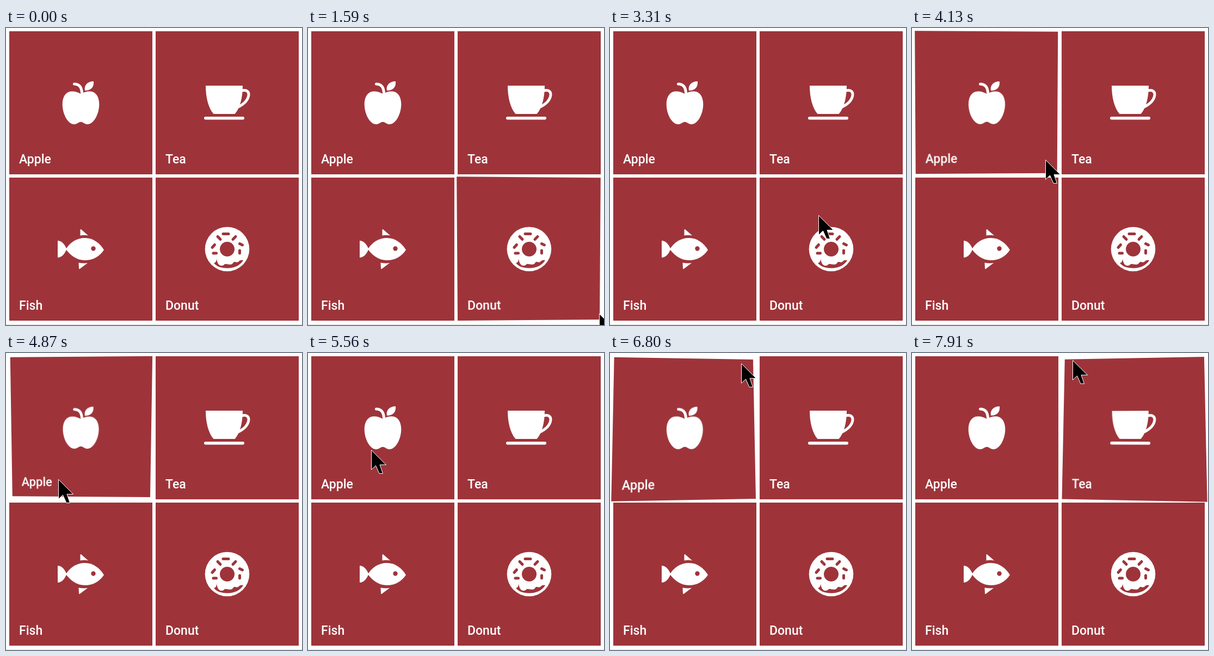
An HTML page for the animation above (8000 ms loop, 544 px wide and 546 px high).

```html
<!DOCTYPE html>
<html lang="en">
<head>
<meta charset="utf-8">
<title>Tilting tiles</title>
<style>
  html, body { margin: 0; width: 100%; height: 100%; overflow: hidden; background: #fff; }
  #stage { position: relative; width: 544px; height: 546px; overflow: hidden; }
  #tiles { position: absolute; left: 6px; top: 6px; display: grid; grid-template: 263px 263px / 263px 263px; gap: 6px; }
  .tile { display: block; width: 263px; height: 263px; background: #9e343a; fill: #fff; }
  .tile text { font: 500 23px Roboto, "Noto Sans", sans-serif; }
  .line, .sprinkle { fill: none; stroke: #fff; stroke-width: 5; stroke-linecap: round; }
  .sprinkle { stroke: #9e343a; }
  .cut { fill: #9e343a; }
  #rule { position: absolute; top: 545px; width: 100%; height: 1px; background: #ddd; }
  #cursor { position: absolute; left: 0; top: 0; width: 30px; height: 46px; }
</style>
</head>
<body>
<div id="stage">
  <div id="rule"></div>
  <div id="tiles">
    <svg class="tile" viewBox="-131.5 -131.5 263 263">
      <path id="half" d="M-1 -16.5H0C5 -19.500 12 -21.500 17 -21C28 -20.500 33.800 -10.500 33.800 2.500C33.800 20.500 24 39.500 12 39.500C6.500 39.500 4 35 0 35H-1Z"/>
      <use href="#half" transform="scale(-1 1)"/>
      <path class="line" d="M-12 -34.500C-3.500 -34.500 1.500 -29.500 2 -18"/>
      <path d="M23.500 -39.500C24.500 -29.500 19.500 -22.500 7.500 -22.500C5.500 -31.500 11.500 -39.500 23.500 -39.500Z"/>
      <text x="-113.5" y="111.5">Apple</text>
    </svg>
    <svg class="tile" viewBox="-131.5 -131.5 263 263">
      <path d="M-39.500 -31.500H28.500C28.500 -10 23.500 10 14 20.500H-25C-34.500 10 -39.500 -10 -39.500 -31.500Z"/>
      <path class="line" d="M27.500 -22.500C35.500 -24.500 40 -20.500 39.500 -14.500C38.500 -5.500 30.500 2.500 20.500 7.500"/>
      <rect x="-42.500" y="25.500" width="74" height="5.500" rx="2.700"/>
      <text x="-113.5" y="111.5">Tea</text>
    </svg>
    <svg class="tile" viewBox="-131.5 -131.5 263 263">
      <path d="M-27.500 0C-19.500 -12.500 -7.500 -20.500 7.500 -20.500S34.500 -11.500 42.500 1.500C34.500 13.500 22.500 20.500 7.500 20.500S-19.500 11.500 -27.500 0Z"/>
      <path d="M-42.500 -15.500Q-32.500 -15.500 -26 0Q-32.500 15.500 -42.500 15.500Z"/>
      <path d="M-1 -35.500Q-.5 -37.500 1.500 -35.500L13.500 -25Q6.500 -26.500 -1 -25Z"/>
      <path d="M-4 25Q4.500 26.500 12.500 25.500L-1.500 36Q-3.500 37.500 -3.500 35Z"/>
      <circle class="cut" cx="23" cy="-1" r="4.200"/>
      <text x="-113.5" y="111.5">Fish</text>
    </svg>
    <svg class="tile" viewBox="-131.5 -131.5 263 263">
      <circle r="40.800"/>
      <circle class="cut" r="13.500"/>
      <path class="sprinkle" d="M-7.500 -28h10M-17.500 -23l5 5M10.500 -18l5 -5M23 -10l5 2.500M23 2.500v5M-27.500 -3l4.500 -5M-25.500 7.500h5.500"/>
      <path class="cut" d="M-19.500 17.500C-18.500 23.500 -16.500 30.500 -10.500 30.500S-6.500 26.500 -1.500 27.500S9.500 29.500 11.500 24.500C13.500 21.500 17.500 26.500 21.500 22.500C24.500 19.500 27.500 20.500 29.500 20.500C24.500 29.500 13.500 35 .5 35S-19.500 31.500 -24.500 25.500C-22.500 25.500 -19.500 23.500 -19.500 17.500Z"/>
      <text x="-113.5" y="111.5">Donut</text>
    </svg>
  </div>
  <svg id="cursor" viewBox="0 0 30 46">
    <path d="M.5 .5V36.500L8.500 29L15 43.500H21.500L16 27.500H27.500Z" stroke="#fff"/>
  </svg>
</div>
<script>
  const LOOP = 8000, TICK = 66.5, PITCH = 269, HALF = 131.5;
  const DEPTH = .0222, SHRINK = .03, SETTLE = .34;
  const tiles = [...document.querySelectorAll('.tile')];
  const cursor = document.getElementById('cursor');

  // Move to a point, rest there, press until `up`, then settle.
  const enter = { time: 390, x: 520, y: 517 };
  const presses = [
    { from: 690, rest: 200, down: 1210, up: 1590, settle: 50, x: 535, y: 525 },
    { from: 1940, down: 2450, up: 2830, x: 451, y: 394 },
    { from: 3020, down: 3810, up: 4130, settle: 40, x: 245, y: 242 },
    { from: 4440, down: 4870, up: 5170, x: 96, y: 232 },
    { from: 5420, down: 5810, up: 6110, x: 147, y: 96 },
    { from: 6360, down: 6800, up: 7100, x: 241, y: 19 },
    { from: 7410, down: 7910, up: LOOP, x: 295, y: 13 }
  ];

  const ease = p => p * p * (3 - 2 * p);
  const mix = (a, b, p) => Math.round(a + (b - a) * p);

  // The cursor advances once per tick.
  function progress(t, { from, down, rest = 0 }) {
    const span = down - rest - from, gaps = Math.round(span / TICK);
    const step = Math.min(gaps, Math.floor((t - from) / span * gaps));
    return ease((step + 1) / (gaps + 1));
  }

  // The pressed side recedes; presses near the middle also shrink the tile.
  function tilt(nx, ny, strength) {
    const edge = Math.max(Math.abs(nx), Math.abs(ny));
    const s = 1 - SHRINK * strength * (1 - edge ** 4);
    const k = DEPTH * strength / HALF;
    return `matrix3d(${s},0,0,${k * nx}, 0,${s},0,${k * ny}, 0,0,1,0, 0,0,0,1)`;
  }

  function draw(t) {
    const index = presses.findLastIndex(p => t >= p.from);
    const press = presses[index], last = presses[index - 1] || enter;
    let { x, y } = enter;
    tiles.forEach(tile => tile.style.transform = 'none');

    if (press) {
      const p = progress(t, press);
      x = mix(last.x, press.x, p);
      y = mix(last.y, press.y, p);
      if (t >= press.down && t < press.up + (press.settle || 0)) {
        const col = +(x > PITCH), row = +(y > PITCH);
        const offset = (v, cell) => (v - 6 - HALF - cell * PITCH) / HALF;
        tiles[row * 2 + col].style.transform =
          tilt(offset(x, col), offset(y, row), t < press.up ? 1 : SETTLE);
      }
    }
    cursor.style.visibility = t < enter.time ? 'hidden' : 'visible';
    cursor.style.transform = `translate(${x}px, ${y}px)`;
  }

  const begin = performance.now();
  function frame() {
    draw((performance.now() - begin) % LOOP);
    requestAnimationFrame(frame);
  }
  frame();
</script>
</body>
</html>
```
